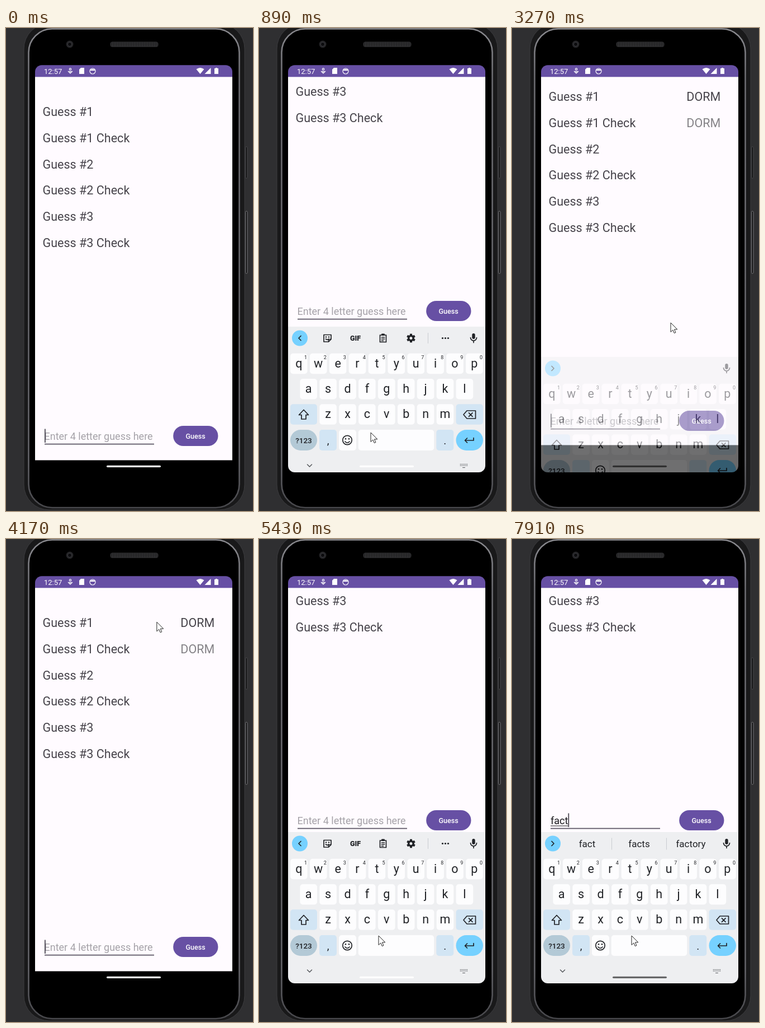
Animation of 442x862 px, one loop 8000 ms. Source, as an HTML page:

```html
<!DOCTYPE html>
<html lang="en">
<head>
<meta charset="utf-8">
<title>Word guess on a phone</title>
<style>
html, body { margin: 0; width: 100%; height: 100%; overflow: hidden; background: #2f2f31; }
svg { display: block; width: 100%; height: 100%; }
text { font-family: Roboto, "Noto Sans", sans-serif; white-space: pre; }
.line { fill: none; stroke: #202226; stroke-width: 1.7; stroke-linecap: round; stroke-linejoin: round; }
.mid { text-anchor: middle; }
</style>
</head>
<body>
<svg viewBox="0 0 442 862">
  <defs>
    <clipPath id="display"><rect x="52" y="66.3" width="353" height="726.7" rx="12"/></clipPath>
    <clipPath id="app"><rect x="52" y="87" width="353" height="706"/></clipPath>
    <pattern id="mesh" width="3" height="3" patternUnits="userSpaceOnUse">
      <rect width="3" height="3" fill="#1c1c1d"/><circle cx="1.5" cy="1.5" r=".9" fill="#4a4a4c"/>
    </pattern>
    <linearGradient id="edge" x1="0" y1="0" x2="0" y2="1">
      <stop offset="0" stop-color="#8b8b90"/><stop offset=".1" stop-color="#6c6c71"/>
      <stop offset=".9" stop-color="#626267"/><stop offset="1" stop-color="#48484c"/>
    </linearGradient>
  </defs>

  <rect width="442" height="862" fill="#2f2f31"/>
  <g fill="#1a1a1b" stroke-width="1">
    <rect x="428.500" y="212" width="3.500" height="56" rx="1.5" stroke="#4a4a4d"/>
    <rect x="428.500" y="327" width="3.500" height="111" rx="1.5" stroke="#77777a"/>
  </g>
  <rect x="32" y="-8" width="395" height="868" rx="45" fill="#19191a" stroke="#3c3c3f"/>
  <rect x="40.500" y="1.500" width="377" height="854.500" rx="42" fill="#000" stroke="url(#edge)" stroke-width="2.6"/>
  <circle cx="114" cy="29" r="6.5" fill="#242426"/>
  <circle cx="114" cy="29" r="3.6" fill="#0c0c0e" stroke="#3b3b40"/>
  <rect x="187" y="25" width="85" height="8.5" rx="3" fill="url(#mesh)" stroke="#2c2c2e"/>

  <g clip-path="url(#display)">
    <g clip-path="url(#app)">
      <g id="page">
        <rect x="52" y="80" width="353" height="691.4" fill="#fffbff"/>
        <g id="list" font-size="21.55" fill="#47444b"></g>
        <g id="answer" font-size="21.55">
          <text x="312.3" y="157" fill="#47444b">DORM</text>
          <text x="312.3" y="203.8" fill="#858387">DORM</text>
        </g>
        <text id="hint" x="68.5" y="735" font-size="18" fill="#a5a2a8">Enter 4 letter guess here</text>
        <text id="typed" x="69" y="735" font-size="18" fill="#1c1b1f"></text>
        <rect id="compose" x="69" y="737.5" height="1" fill="#1c1b1f"/>
        <rect x="69" y="741.7" width="196" height="1.8" fill="#5f5868"/>
        <rect id="caret" y="715.5" width="1.8" height="24.5" fill="#4e4a55"/>
        <rect x="299.2" y="710" width="80.3" height="36" rx="18" fill="#6750a4"/>
        <text class="mid" x="339.2" y="733" font-size="12.6" font-weight="500" fill="#fff">Guess</text>
      </g>
    </g>
    <g id="board"></g>
    <rect id="handle" x="180" y="780.7" width="97" height="3.3" rx="1.65"/>

    <rect x="52" y="66" width="353" height="21.3" fill="#6750a4"/>
    <g fill="#fff">
      <text x="68" y="82" font-size="13">12:57</text>
      <path d="M131 74l3-3h6v11h-9z"/>
      <path d="M340.500 73.500Q347.500 68.500 354.500 73.500L347.500 82z"/>
      <path d="M366.500 71v11h-11z"/>
      <path d="M373 72h2v-1h3v1h2v10h-7z"/>
      <path d="M150.500 76a5 5 0 0 1 9 0z"/>
    </g>
    <g fill="none" stroke="#fff" stroke-width="1.2">
      <circle cx="155" cy="77" r="5"/>
      <circle cx="115" cy="73.500" r="1.700"/>
      <path d="M111 77l4 4 4-4M113 77l2 1.500 2-1.500"/>
    </g>
  </g>
  <path id="mouse" d="M0 0V16.500L3.900 12.900 6.300 18.600 8.900 17.500 6.500 11.900H11.800z" fill="#fff" stroke="#222" stroke-width="1"/>
</svg>
<script>
const $ = id => document.getElementById(id);
const LOOP = 8000, PAN = 226, SLIDE = 72;
const INK = '#202226', PALE = '#d2e5f4', SKY = '#76d1ff';

const rect = (x, y, w, h, r, fill) =>
  `<rect x="${x}" y="${y}" width="${w}" height="${h}" rx="${r}" fill="${fill}"/>`;
const label = (s, x, y, size, extra = '') =>
  `<text class="mid" x="${x}" y="${y}" font-size="${size}" fill="${INK}" ${extra}>${s}</text>`;
const line = d => `<path class="line" d="${d}"/>`;
const dot = (x, y, r, fill = INK) => `<circle cx="${x}" cy="${y}" r="${r}" fill="${fill}"/>`;

function letterRow(letters, x0, y) {
  return [...letters].map((c, i) => {
    const x = x0 + i * 34.9;
    return rect(x - 15.3, y, 30.6, 36.5, 5, '#fdfdfe') + label(c, x, y + 25, 21.5);
  }).join('');
}

function gear(x, y) {
  let teeth = '';
  for (let a = 0; a < 360; a += 60)
    teeth += `<rect x="${x - 2}" y="${y - 7.8}" width="4" height="4" fill="${INK}" transform="rotate(${a} ${x} ${y})"/>`;
  return teeth + `<circle cx="${x}" cy="${y}" r="4.2" fill="none" stroke="${INK}" stroke-width="3.4"/>`;
}

function buildBoard() {
  const digits = [...'1234567890'].map((d, i) => label(d, 83.5 + i * 34.9, 581, 9)).join('');
  let softKeys = '';
  for (let r = 0; r < 2; r++)
    for (let c = 0; c < 6; c++) softKeys += dot(360.5 + c * 2.4, 768.5 + r * 2.6, .75, '#55585c');

  const tools =
    line('M116 537.5h13v8l-4.500 4.500h-8.500zM129 545.500h-4.500v4.500M119.500 545q3 2.500 5 0') +
    dot(120, 541.5, 1.2) + dot(125, 541.5, 1.2) +
    label('GIF', 172.5, 548, 12.5, 'font-weight="900"') +
    line('M216.500 538h11v12.500h-11zM219.500 542h5M219.500 545h5M219.500 548h3') +
    rect(219, 535.5, 6, 3.6, 1, INK) + gear(272, 543.5) +
    rect(302, 534, 1, 19, 0, '#c9ccd0') +
    dot(328.5, 543.5, 1.6) + dot(333.5, 543.5, 1.6) + dot(338.5, 543.5, 1.6);

  const words = [134.5, 227.5, 320].map(x => label('', x, 550, 17)).join('');

  return rect(52, 523, 353, 275, 0, '#eeeff1') +
    dot(73, 543.5, 14, SKY) + `<path id="arrow" class="line"/>` +
    `<g id="tools">${tools}</g>` +
    `<g id="words">${words}<path d="M178.500 533.500v21M276.500 533.500v21" stroke="#c9ccd0"/></g>` +
    rect(381.3, 535, 5.4, 10, 2.7, INK) + line('M378.500 542.500a5.500 5.500 0 0 0 11 0M384 548v3.500') +
    letterRow('qwertyuiop', 71.3, 570.7) + digits +
    letterRow('asdfghjkl', 88.7, 616) + letterRow('zxcvbnm', 123.6, 661.3) +
    rect(56, 661.3, 48, 36.5, 5, PALE) + line('M80 671.500l8.500 9h-4.500v7.500h-8v-7.500h-4.500z') +
    rect(352.5, 661.3, 48.5, 36.5, 5, PALE) +
    line('M372 673h15.500v14h-15.500l-6-7zM375.500 676.800l6.500 6.500M382 676.800l-6.500 6.500') +
    rect(56, 707, 48, 37, 18.5, '#b3c9d6') + label('?123', 80, 730.5, 13.5, 'font-weight="500"') +
    rect(108, 707, 31, 37, 5, PALE) + label(',', 123.5, 733, 19) +
    rect(143, 707, 31, 37, 5, '#fdfdfe') +
    `<circle class="line" cx="158" cy="725.5" r="8.2"/>` + dot(155, 723.3, 1.3) + dot(161, 723.3, 1.3) +
    line('M154 728q4 4.500 8 0') +
    rect(177.7, 707, 135.5, 37, 5, '#fdfdfe') +
    rect(317.3, 707, 31, 37, 5, PALE) + label('.', 332.8, 733, 19) +
    rect(352.5, 707, 48.5, 37, 18.5, SKY) + line('M384 721.500v4.500h-15M372.500 722l-4 4 4 4') +
    `<path class="line" style="stroke:#55585c;stroke-width:1.5" d="M86.500 769l4 4 4-4"/>` +
    softKeys + rect(364, 774, 5, 1.1, .5, '#55585c');
}

$('list').innerHTML = [1, 2, 3].map(n => {
  const y = 157 + (n - 1) * 93.6;
  return `<text x="65.500" y="${y}">Guess #${n}</text><text x="65.500" y="${y + 46.8}">Guess #${n} Check</text>`;
}).join('');
$('board').innerHTML = buildBoard();
const wordNodes = $('words').querySelectorAll('text');

// Timelines: [start, value]
const SUBMIT = 3067;
const TYPED = [[0, ''], [1160, 'd'], [1440, 'do'], [1650, 'dor'], [1900, 'dorm'], [SUBMIT, ''],
  [6760, 'f'], [6960, 'fa'], [7230, 'fac'], [7710, 'fact']];
const WORDS = [[0, null], [1230, "do did don't"], [1510, "do does don't"], [1720, 'for door dorm'],
  [2000, 'dorm firm form'], [SUBMIT, ''], [4700, null], [6830, 'for from find'],
  [7030, 'far fat fast'], [7300, 'fact face facsimile'], [7910, 'fact facts factory']];
const CARET = [[0, 1], [500, 0], [1160, 1], [2500, 0], [3000, 1], [3570, 0], [4070, 1], [4570, 0],
  [5640, 1], [6340, 0], [6620, 1]];
// Pointer stops: [time, x, y]
const MOUSE = [[70, 262, 837], [520, 200, 722], [2210, 200, 722], [2420, 297, 711], [2900, 320, 502],
  [3080, 320, 502], [3270, 284, 526], [3720, 318, 76], [4310, 262, 160], [4450, 262, 160],
  [4780, 178, 722], [5010, 182, 715], [5400, 214, 708], [LOOP, 214, 708]];

const at = (steps, t) => steps.reduce((v, s) => t >= s[0] ? s[1] : v, steps[0][1]);
const clamp = x => Math.max(0, Math.min(1, x));
const span = (t, start, length) => clamp((t - start) / length);
const easeOut = x => 1 - (1 - x) ** 3;
const smooth = x => x * x * (3 - 2 * x);

function pointer(t) {
  let i = MOUSE.findIndex(s => s[0] > t);
  if (i < 1) i = MOUSE.length - 1;
  const [t0, x0, y0] = MOUSE[i - 1], [t1, x1, y1] = MOUSE[i];
  const k = smooth(span(t, t0, t1 - t0));
  return [x0 + (x1 - x0) * k, y0 + (y1 - y0) * k];
}

const show = (id, on) => $(id).setAttribute('display', on ? 'inline' : 'none');
const moveY = (id, y) => $(id).setAttribute('transform', `translate(0 ${Math.round(y)})`);

function render(t) {
  const pan = [584, SUBMIT, 4807].map(s => easeOut(span(t, s, 400)));
  moveY('page', -PAN * (pan[0] - pan[1] + pan[2]));

  const [a, b, c] = [741, 3115, 4962].map(s => span(t, s, 196));
  moveY('board', SLIDE * (1 - smooth(a) + smooth(b) - smooth(c)));
  $('board').setAttribute('opacity', clamp(a / .29) - clamp((b - .56) / .42) + clamp(c / .29));

  // The handle turns from solid white to translucent black over the keyboard.
  const dark = span(t, 1250, 1000) - span(t, 3330, 700) + span(t, 5500, 1120);
  const shade = Math.round(255 * (1 - dark));
  $('handle').setAttribute('fill', `rgb(${shade},${shade},${shade})`);
  $('handle').setAttribute('opacity', 1 - .43 * dark);

  const text = at(TYPED, t);
  $('typed').textContent = text;
  const width = text ? $('typed').getComputedTextLength() : 0;
  $('compose').setAttribute('width', width);
  $('caret').setAttribute('x', 69 + width);
  show('caret', at(CARET, t));
  show('hint', !text);
  show('answer', t >= SUBMIT);

  const words = at(WORDS, t);
  show('tools', words === null);
  show('words', words);
  const list = (words || '').split(' ');
  wordNodes.forEach((node, i) => node.textContent = list[i] || '');
  $('arrow').setAttribute('d', words === null ? 'M75 539.500l-4 4 4 4' : 'M71 539.500l4 4-4 4');

  const [x, y] = pointer(t);
  $('mouse').setAttribute('transform', `translate(${x} ${y})`);
  show('mouse', t >= 70);
}

const begin = performance.now();
function tick() {
  render((performance.now() - begin) % LOOP);
  requestAnimationFrame(tick);
}
tick();
</script>
</body>
</html>
```
